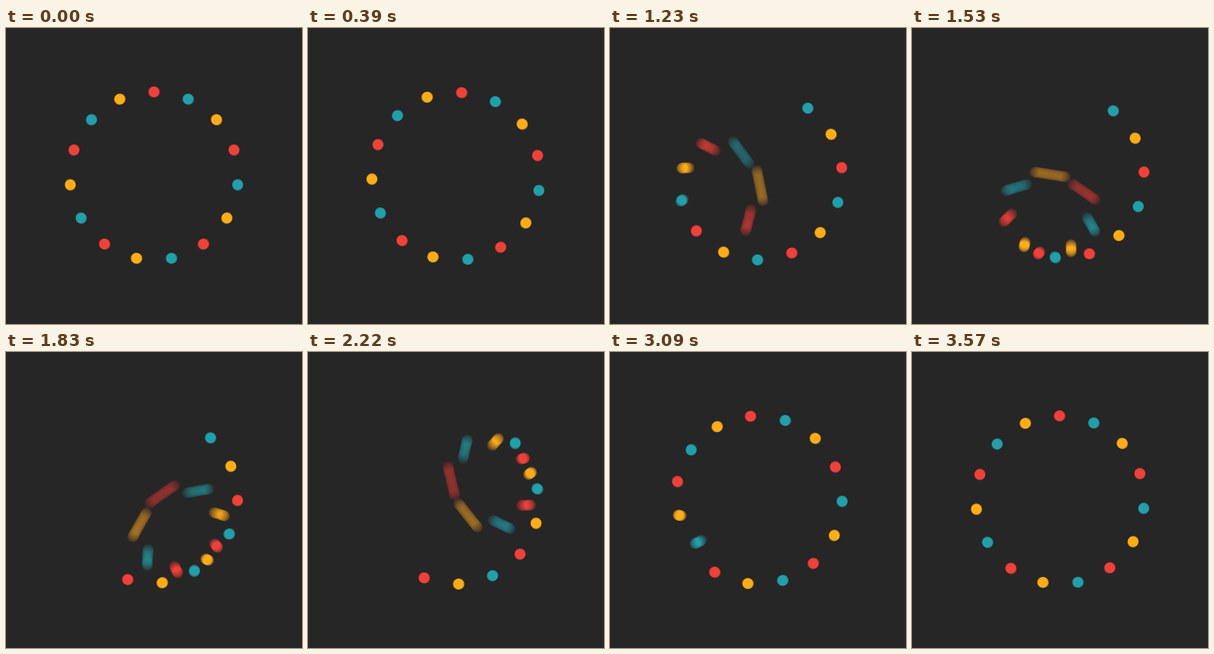
An HTML page with a canvas for the animation above (3600 ms loop, 400 by 400 pixels).

```html
<!DOCTYPE html>
<html lang="en">
<head>
<meta charset="utf-8">
<title>Crossing dots</title>
<style>
  html, body { margin: 0; width: 100%; height: 100%; overflow: hidden; background: #262626; }
  canvas { display: block; width: 400px; height: 400px; }
</style>
</head>
<body>
<canvas id="stage" width="400" height="400"></canvas>
<script>
const SIZE = 400, CENTER = 200, RING = 113.7, DOT = 7.4;
const COUNT = 15, LOOP = 3600, STEP = 30;
const STAGGER = 120, CROSSING = 1080, STEEPNESS = 0.0041;
const SHUTTER = 95, SAMPLES = 24;
const BACK = [38, 38, 38];
const COLORS = [[240, 65, 57], [255, 173, 20], [32, 160, 171]];

// Exposure is averaged in squared (roughly linear) light.
const square = rgb => rgb.map(v => v * v);
const back = square(BACK);
const gains = COLORS.map(c => square(c).map((v, k) => (v - back[k]) / SAMPLES));

const ctx = document.getElementById('stage').getContext('2d');
const image = ctx.createImageData(SIZE, SIZE);
const light = new Float32Array(SIZE * SIZE * 3);

// Each dot swings through the center while the ring turns 36 degrees per loop.
function position(i, t) {
  const angle = (t * 36 / LOOP - i * 360 / COUNT) * Math.PI / 180;
  const r = -RING * Math.tanh(STEEPNESS * (t - i * STAGGER - CROSSING));
  return [CENTER + r * Math.sin(angle), CENTER - r * Math.cos(angle)];
}

function expose(x, y, gain) {
  const reach = DOT + 1;
  for (let py = Math.floor(y - reach); py <= y + reach; py++) {
    for (let px = Math.floor(x - reach); px <= x + reach; px++) {
      const d = Math.hypot(px + 0.5 - x, py + 0.5 - y);
      const cover = Math.min(1, DOT + 0.5 - d);
      if (cover <= 0) continue;
      const at = (py * SIZE + px) * 3;
      for (let k = 0; k < 3; k++) light[at + k] += gain[k] * cover * cover;
    }
  }
}

function draw(t) {
  light.fill(0);
  for (let i = 0; i < COUNT; i++) {
    for (let s = 0; s < SAMPLES; s++) {
      const shift = ((s + 0.5) / SAMPLES - 0.5) * SHUTTER;
      const [x, y] = position(i, t + shift);
      expose(x, y, gains[i % COLORS.length]);
    }
  }
  const data = image.data;
  for (let p = 0; p < SIZE * SIZE; p++) {
    for (let k = 0; k < 3; k++) {
      data[p * 4 + k] = Math.sqrt(Math.max(0, back[k] + light[p * 3 + k]));
    }
    data[p * 4 + 3] = 255;
  }
  ctx.putImageData(image, 0, 0);
}

const start = performance.now();
let shown = -1;
function tick() {
  const elapsed = Math.max(0, performance.now() - start) % LOOP;
  const t = Math.floor(elapsed / STEP) * STEP;
  if (t !== shown) draw(shown = t);
  requestAnimationFrame(tick);
}
tick();
</script>
</body>
</html>
```
